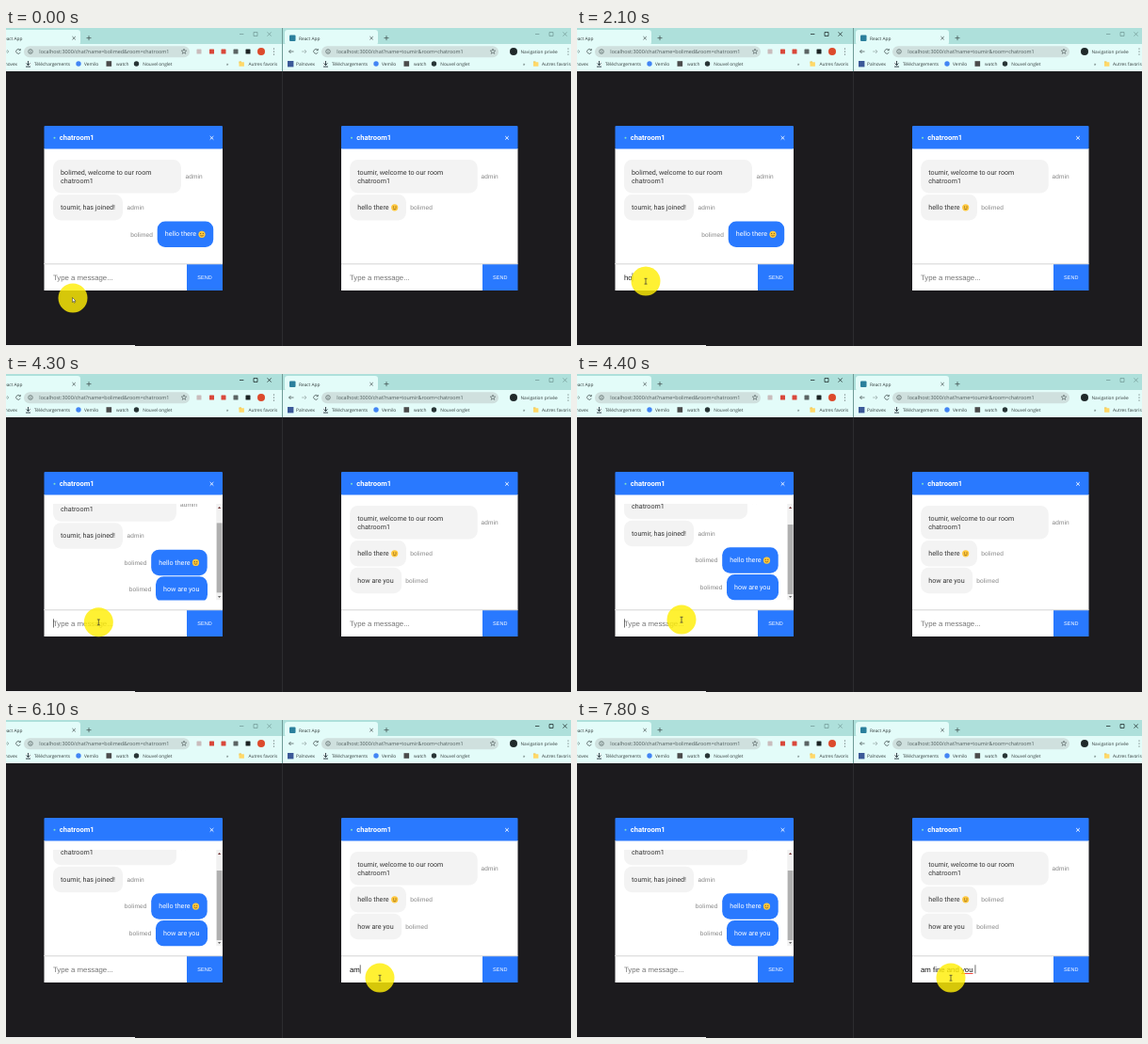
An HTML page for the animation above (8000 ms loop, 600 by 338 pixels).

```html
<!DOCTYPE html>
<html lang="en">
<head>
<meta charset="utf-8">
<title>Chat room</title>
<style>
html, body { margin: 0; width: 100%; height: 100%; overflow: hidden; background: #1c1b1e; }
svg { display: block; width: 600px; height: 338px; }
text { text-rendering: geometricPrecision; white-space: pre; }
.ui { font: 4.8px "Open Sans", "Noto Sans", sans-serif; fill: #333c3c; }
.url { font-size: 5.42px; fill: #4c5a5a; }
.msg { font: 7.15px Roboto, sans-serif; fill: #353535; }
.title { font: bold 7.6px Roboto, sans-serif; fill: #fff; }
.who { font: 6.5px "Liberation Sans", Arial, sans-serif; letter-spacing: .12px; fill: #828282; }
.input { font: 7.8px "Liberation Sans", Arial, sans-serif; fill: #111; }
.hint { fill: #757575; }
.send { font: 5.5px "Liberation Sans", Arial, sans-serif; fill: #fff; text-anchor: middle; }
</style>
</head>
<body>
<svg viewBox="0 0 600 338">
  <clipPath id="leftWindow"><rect width="293" height="338"/></clipPath>
  <clipPath id="list"><rect x="40" y="138" width="190" height="102.5"/></clipPath>
  <g id="base"></g>
  <g id="live"></g>
</svg>
<script>
const LOOP = 8000, STEP = 100;
const BLUE = '#2979ff', GREY = '#f3f3f3', BAR = '#e3fcf9', PILL = '#cfe0de', INK = '#3c4848';
const ANN = 'bolimed', BOB = 'toumir';

const rect = (x, y, w, h, fill, rx = 0) =>
  `<rect x="${x}" y="${y}" width="${w}" height="${h}" rx="${rx}" fill="${fill}"/>`;
const disc = (x, y, r, fill) => `<circle cx="${x}" cy="${y}" r="${r}" fill="${fill}"/>`;
const line = (d, stroke, width = .7) =>
  `<path d="${d}" fill="none" stroke="${stroke}" stroke-width="${width}"/>`;
const text = (x, y, kind, s, fill) =>
  `<text x="${x}" y="${y}" class="${kind}"${fill ? ` style="fill:${fill}"` : ''}>${s.replace(/&/g, '&amp;')}</text>`;

const star = (x, y) => line('M' + Array.from({ length: 10 }, (_, i) => {
  const r = i % 2 ? 1.2 : 2.9, a = i * Math.PI / 5 - Math.PI / 2;
  return `${x + r * Math.cos(a)} ${y + r * Math.sin(a)}`;
}).join('L') + 'Z', INK, .5);
const dots = x => [22, 25, 28].map(y => disc(x, y, .55, INK)).join('');
const folder = x => rect(x, 35.5, 2.5, 2, '#e8bd45') + rect(x, 36.2, 5.4, 4.6, '#ffd868', .4);

// Browser frame: x is the window's left origin, edge its right side, starX the end of the address bar.
function browser(x, edge, starX, name) {
  const at = n => x + n, left = Math.max(x, 0);
  return rect(left, 0, edge - left, 18, '#aee0db')
    + rect(at(2), 2, 99, 16, BAR, 3) + rect(left, 17, edge - left, 29, BAR)
    + rect(at(7), 7.5, 6.5, 6.5, '#2b7f9c', 1) + text(at(17), 12.5, 'ui', 'React App')
    + line(`M${at(92.4)} 9l3.4 3.4m0-3.4l-3.4 3.4`, INK)
    + line(`M${at(107.5)} 10.6h5m-2.5-2.5v5`, INK)
    + line(`M${at(11.5)} 25h-5m2-2l-2 2l2 2`, INK) + line(`M${at(20)} 25h5m-2-2l2 2l-2 2`, '#97aaa8')
    + line(`M${at(37)} 23.4a2.4 2.4 0 1 0 .3 2.4M${at(37.3)} 22v1.8h-1.8`, INK)
    + rect(at(41), 19.2, starX + 6 - at(41), 12, PILL, 6) + star(starX, 25)
    + `<circle cx="${at(48)}" cy="25" r="2.3" fill="none" stroke="${INK}" stroke-width=".6"/>`
    + line(`M${at(48)} 23.6v.7m0 .5v1.6`, INK, .6)
    + text(at(57.3), 27, 'ui url', `localhost:3000/chat?name=${name}&room=chatroom1`)
    + rect(at(5), 35, 6.4, 6.4, '#3b5998') + text(at(14), 40, 'ui', 'Palnovex')
    + line(`M${at(45.5)} 35v4.5m-2-2l2 2l2-2m-4.5 3.6h5`, '#27333a', .9)
    + text(at(52), 40, 'ui', 'Téléchargements')
    + disc(at(99), 38, 2.7, '#4285f4') + text(at(105), 40, 'ui', 'Vemilo')
    + rect(at(128.5), 35.2, 5.6, 5.6, '#4b4b4b') + text(at(139), 40, 'ui', 'watch')
    + disc(at(160.5), 38, 2.7, '#273435') + text(at(167.3), 40, 'ui', 'Nouvel onglet');
}

function card(x, w, sendX) {
  return rect(x, 128, w, 123, '#fff') + rect(x, 250, sendX - x, 29, '#fff')
    + rect(x, 104, w, 24.5, BLUE, 1) + rect(sendX, 251, x + w - sendX, 28, BLUE)
    + disc(x + 11, 116.8, 1, '#7fe0c8') + text(x + 16.2, 119.4, 'title', 'chatroom1')
    + line(`M${x + w - 13.3} 115l3.6 3.6m0-3.6l-3.6 3.6`, '#fff', .9)
    + rect(x, 250.4, w, .9, '#cfcfcf')
    + text((sendX + x + w) / 2, 266.8, 'send', 'SEND');
}

const bubble = (x, y, w, lines, fill = GREY) =>
  rect(x, y, w, lines.length > 1 ? 35.5 : 27.5, fill, 8.3)
  + lines.map((s, i) => text(x + 8.1, y + 15.9 + i * 8.7, 'msg', s, fill === BLUE ? '#fff' : '')).join('');

const emoji = (x, y) => disc(x, y, 3.6, '#ffc83d') + disc(x - 1.3, y - .8, .55, '#5a3a12')
  + disc(x + 1.3, y - .8, .55, '#5a3a12') + line(`M${x - 1.7} ${y + 1}q1.7 1.7 3.4 0`, '#5a3a12', .6);

const welcome = name => [`${name}, welcome to our room`, 'chatroom1'];

function leftList(t) {
  const sent = t >= 4200, shift = sent ? 6.5 : 0;
  const k = Math.min(Math.max((t - 4100) / 300, 0), 1);
  const scroll = 21.2 * (1 - (1 - k) ** 2);
  let s = bubble(50, 140, sent ? 131 : 136, welcome(ANN)) + text(sent ? 185 : 190.5, 159.5, 'who', 'admin')
    + bubble(50, 177, 74, [BOB + ', has joined!']) + text(128.5, 193, 'who', 'admin')
    + bubble(160.7 - shift, 205.5, 59.5, ['hello there'], BLUE) + emoji(208 - shift, 219.3)
    + text(132.3 - shift, 221.5, 'who', ANN);
  if (sent) s += bubble(159, 234.2, 55, ['how are you'], BLUE) + text(130.8, 250, 'who', ANN);
  s = `<g transform="translate(0 ${-scroll})">${s}</g>`;
  if (sent) {
    s += rect(223.3, 138, 6.7, 102.5, '#f1f1f1') + rect(223.7, 145 + scroll * .71, 5.9, 74, '#b0b0b0')
      + '<path d="M225 143l1.6-2l1.6 2z" fill="#6b2b2b"/><path d="M225 236l1.6 2l1.6-2z" fill="#666"/>';
  }
  return `<g clip-path="url(#list)">${s}</g>`;
}

function rightList(t) {
  let s = bubble(365.2, 140, 135.5, welcome(BOB)) + text(504.5, 159.5, 'who', 'admin')
    + bubble(365.2, 177, 59.8, ['hello there']) + emoji(412.7, 190.8) + text(429.3, 193, 'who', ANN);
  if (t >= 4200) s += bubble(365.2, 205.7, 55, ['how are you']) + text(424.3, 221.5, 'who', ANN);
  return s;
}

// Each field: key times per character, caret on/off switches, misspelt words as [time, start, end].
const fields = [
  { x: 50, words: 'how are you', clear: 4200,
    keys: [1900, 2100, 2200, 2300, 2500, 2600, 2700, 2800, 3100, 3400, 3700],
    caret: [500, 700, 900, 1100, 1400, 1600, 1900, 4700], marks: [[2300, 0, 3], [2800, 4, 7]] },
  { x: 365, words: 'am fine and you ', clear: LOOP,
    keys: [5900, 6100, 6200, 6300, 6400, 6500, 6600, 6700, 6800, 6800, 7100, 7100, 7300, 7300, 7500, 7800],
    caret: [5100, 5300, 5600, LOOP], marks: [[7800, 12, 15]] },
];
const ruler = document.createElement('canvas').getContext('2d');
ruler.font = '78px "Liberation Sans", Arial, sans-serif';
const widthOf = s => ruler.measureText(s).width / 10;

function field({ x, words, clear, keys, caret, marks }, t) {
  const typed = t < clear ? words.slice(0, keys.filter(k => k <= t).length) : '';
  let s = typed ? text(x, 267.7, 'input', typed) : text(x, 267.7, 'input hint', 'Type a message...');
  if (typed) for (const [from, a, b] of marks) if (t >= from)
    s += line(`M${x + widthOf(words.slice(0, a))} 269.5H${x + widthOf(words.slice(0, b))}`, '#f0453c', 1);
  if (caret.filter(c => c <= t).length % 2) s += rect(x + widthOf(typed), 260.3, .6, 9.2, '#111');
  return s;
}

const controls = (x, active) => line(`M${x} 6.5h4.4M${x + 15} 4.5h4v4h-4zM${x + 29.5} 4.4l4.2 4.2m0-4.2l-4.2 4.2`,
  active ? '#101818' : '#6f9693', .7);

const path = [[0, 71, 287], [100, 71, 287], [500, 73, 269], [4100, 73, 269], [4400, 111, 261], [4500, 200, 290],
  [4600, 345, 314], [4700, 468, 302], [4800, 390, 277], [5000, 397, 274], [LOOP, 397, 274]];

function pointer(t) {
  const i = path.findIndex(p => p[0] > t), [t0, x0, y0] = path[i - 1], [t1, x1, y1] = path[i];
  const k = (t - t0) / (t1 - t0), x = x0 + (x1 - x0) * k, y = y0 + (y1 - y0) * k;
  const beam = y < 279 && (x > 41 && x < 192 || x > 356 && x < 506);
  return disc(x, y, 15.5, 'rgba(255, 238, 6, .82)')
    + (beam ? line(`M${x - 1.5} ${y - 2.7}h3m-1.5 0v5.8m-1.5 0h3`, '#333', .7)
      : `<path d="M${x - .5} ${y - .5}v5l1.2-1l.8 1.7l.8-.4l-.8-1.6h1.6z" fill="#fff" stroke="#222" stroke-width=".5"/>`);
}

const extensions = [[205, '#c9bcbc'], [218.5, '#d9483b'], [231, '#d9483b'], [244, '#5b6464'], [257, '#1c2424']];
document.getElementById('base').innerHTML = rect(0, 0, 600, 338, '#1c1b1e')
  + `<g clip-path="url(#leftWindow)">${browser(-22, 293, 189, ANN)}</g>` + browser(294, 600, 517, BOB)
  + extensions.map(([x, c]) => rect(x - 2.5, 22.5, 5, 5, c, .5)).join('')
  + disc(271, 25, 4, '#dc4a2c') + dots(284.5) + dots(597)
  + disc(539, 25, 4, '#20292a') + text(546.5, 26.8, 'ui', 'Navigation privée')
  + [[234, 247.5, 257.5], [549, 560, 569]].map(([a, b, c]) =>
      text(a, 40, 'ui', '»') + folder(b) + text(c, 40, 'ui', 'Autres favoris')).join('')
  + rect(293, 0, 1, 46, '#6f9a96') + rect(293, 46, 1, 292, '#2c2c2f')
  + rect(0, 337, 137, 1, '#f2f2f2')
  + card(40.5, 189.5, 192) + card(356, 187.5, 506);

const live = document.getElementById('live');
let shown = -1;
function draw(now) {
  const t = Math.floor(now % LOOP / STEP) * STEP;
  if (t !== shown) {
    shown = t;
    live.innerHTML = controls(248, t >= 300 && t < 4700) + controls(562, t >= 5100)
      + leftList(t) + rightList(t) + fields.map(f => field(f, t)).join('') + pointer(t);
  }
  requestAnimationFrame(draw);
}
draw(performance.now());
</script>
</body>
</html>
```
